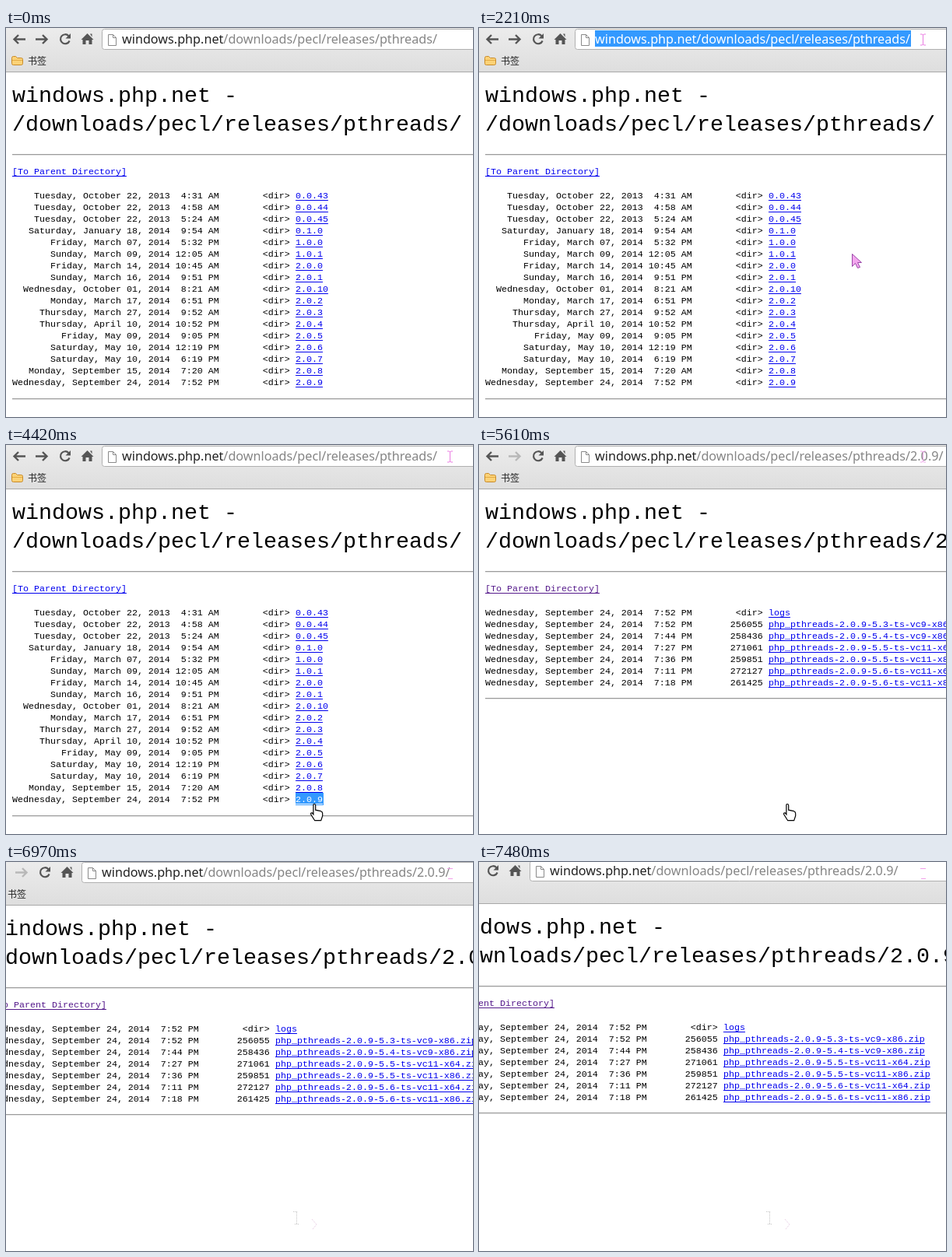
Write an HTML page with a canvas that moves like this. It is 600 by 500 pixels and loops after 7.99 s.

```html
<!DOCTYPE html>
<html lang="zh">
<head>
<meta charset="utf-8">
<style>
  html, body { margin: 0; width: 100%; height: 100%; overflow: hidden; background: #fff; }
  canvas { display: block; }
</style>
</head>
<body>
<canvas id="stage" width="600" height="500"></canvas>
<script>
const ctx = document.getElementById('stage').getContext('2d');
const STEP = 170, STEPS = 47;
const MONO = '"Liberation Mono", monospace';
const LIST_FONT = `${7 / 0.6}px ${MONO}`;      // 7 px per character
const TITLE_FONT = `${17 / 0.6}px ${MONO}`;    // 17 px per character
const URL_FONT = '16.2px "Noto Sans", sans-serif';
const LABEL_FONT = '12px "Noto Sans CJK SC", "Noto Sans CJK", sans-serif';
const LINK = '#0000ee', VISITED = '#551a8b', SELECT = '#3399ff';
const HOST = 'windows.php.net', FOLDER = '/downloads/pecl/releases/pthreads/';

// date, time, size, name
const releases = `Tuesday, October 22, 2013|4:31 AM|<dir>|0.0.43
Tuesday, October 22, 2013|4:58 AM|<dir>|0.0.44
Tuesday, October 22, 2013|5:24 AM|<dir>|0.0.45
Saturday, January 18, 2014|9:54 AM|<dir>|0.1.0
Friday, March 07, 2014|5:32 PM|<dir>|1.0.0
Sunday, March 09, 2014|12:05 AM|<dir>|1.0.1
Friday, March 14, 2014|10:45 AM|<dir>|2.0.0
Sunday, March 16, 2014|9:51 PM|<dir>|2.0.1
Wednesday, October 01, 2014|8:21 AM|<dir>|2.0.10
Monday, March 17, 2014|6:51 PM|<dir>|2.0.2
Thursday, March 27, 2014|9:52 AM|<dir>|2.0.3
Thursday, April 10, 2014|10:52 PM|<dir>|2.0.4
Friday, May 09, 2014|9:05 PM|<dir>|2.0.5
Saturday, May 10, 2014|12:19 PM|<dir>|2.0.6
Saturday, May 10, 2014|6:19 PM|<dir>|2.0.7
Monday, September 15, 2014|7:20 AM|<dir>|2.0.8
Wednesday, September 24, 2014|7:52 PM|<dir>|2.0.9`.split('\n').map(row => row.split('|'));

const files = `7:52 PM|<dir>|logs
7:52 PM|256055|5.3-ts-vc9-x86
7:44 PM|258436|5.4-ts-vc9-x86
7:27 PM|271061|5.5-ts-vc11-x64
7:36 PM|259851|5.5-ts-vc11-x86
7:11 PM|272127|5.6-ts-vc11-x64
7:18 PM|261425|5.6-ts-vc11-x86`.split('\n').map(row => {
  const [time, size, build] = row.split('|');
  const name = size === '<dir>' ? build : `php_pthreads-2.0.9-${build}.zip`;
  return ['Wednesday, September 24, 2014', time, size, name];
});

const arrowShape = new Path2D('M0 0v16l4-4 3 6 3-1-3-6h5z');
const handShape = new Path2D('M6 .5q1.7 0 1.7 1.7v6l7 1.5q2 .7 2 3v3l-2 6h-8l-5-8q-.6-2.2 1.6-1.8l1.6 2v-11.7q0-1.7 1.1-1.7z');
const beamShape = new Path2D('M0 .5h2.5l1 1 1-1h2.5M3.5 1v13M0 14.5h2.5l1-1 1 1h2.5');

const clamp = v => Math.max(0, Math.min(1, v));

function rect(x, y, w, h, color) {
  ctx.fillStyle = color;
  ctx.fillRect(x, y, w, h);
}

function text(str, x, y, font, color = '#000') {
  ctx.font = font;
  ctx.fillStyle = color;
  ctx.fillText(str, x, y);
  return ctx.measureText(str).width;
}

function link(str, x, y, color = LINK) {
  rect(x, y + 2, text(str, x, y, LIST_FONT, color), 1, color);
}

function shape(path, x, y, stroke, fill, width = 1) {
  ctx.save();
  ctx.translate(x, y);
  if (fill) { ctx.fillStyle = fill; ctx.fill(path); }
  if (stroke) { ctx.strokeStyle = stroke; ctx.lineWidth = width; ctx.stroke(path); }
  ctx.restore();
}

const icon = (d, stroke, fill, width) => shape(new Path2D(d), 0, 0, stroke, fill, width);

function highlight(x, y, w, h, drawText) {
  if (w <= 0) return;
  ctx.save();
  ctx.beginPath();
  ctx.rect(x, y, w, h);
  ctx.clip();
  rect(x, y, w, h, SELECT);
  drawText();
  ctx.restore();
}

function rule(y) {
  rect(8, y, 660, 1, '#9a9a9a');
  rect(8, y + 1, 660, 1, '#e4e4e4');
}

function toolbar(path, loading, canGoForward, selected) {
  const shade = ctx.createLinearGradient(0, 0, 0, 56);
  shade.addColorStop(0, '#ececec');
  shade.addColorStop(1, '#dedede');
  rect(0, 0, 700, 56, shade);
  rect(0, 56, 700, 1, '#a8a8a8');

  const dark = '#555';
  icon('M25 14.5H11M16 9l-5.5 5.5L16 20', dark, null, 2.4);
  icon('M38 14.5H52M47 9l5.5 5.5L47 20', canGoForward ? dark : '#b8b8b8', null, 2.4);
  if (loading) {
    icon('M71 9.5l10 10M81 9.5l-10 10', dark, null, 2.4);
  } else {
    icon('M80.5 10.2A6 6 0 1 0 81.6 16.5', dark, null, 2.2);
    icon('M83 7v6.5h-6.5z', null, dark);
  }
  icon('M104.500 7l8 8h-2v6h-4v-5h-4v5h-4v-6h-2zM108 7.500h2.500v4z', null, dark);

  ctx.beginPath();
  ctx.roundRect(123.5, 1.5, 600, 26, 3);
  ctx.fillStyle = '#fff';
  ctx.fill();
  ctx.strokeStyle = '#b0b0b0';
  ctx.lineWidth = 1;
  ctx.stroke();
  icon('M131.500 8.500h6l4 4v10h-10zM137.500 8.500v4h4', '#8a8a8a', '#fff');

  const hostWidth = text(HOST, 149, 20, URL_FONT, '#222');
  text(path, 149 + hostWidth, 20, URL_FONT, '#858585');
  highlight(149, 3, 406 * selected, 21, () => text(HOST + path, 149, 20, URL_FONT, '#fff'));

  icon('M7.500 38.500q0-2 2-2h3l2 2h5q2 0 2 2v5q0 2-2 2h-10q-2 0-2-2z', '#c88a28', '#fbd277');
  icon('M8 41.500h13', '#e3ab45');
  text('书签', 28, 47, LABEL_FONT, '#222');
}

function listing(path, rows, parentColor, selected) {
  text(HOST + ' -', 8, 95, TITLE_FONT);
  text(path, 8, 132, TITLE_FONT);
  rule(162);
  link('[To Parent Directory]', 8, 188, parentColor);
  rows.forEach(([date, time, size, name], i) => {
    const y = 219 + 15 * i;
    const stamp = `${date} ${time.padStart(8)}`.padStart(38);
    text(stamp + size.padStart(13), 8, y, LIST_FONT);
    link(name, 372, y);
  });
  const end = 219 + 15 * rows.length;
  const w = 36 * selected;
  highlight(408 - w, end - 27, w, 16, () => {
    text('2.0.9', 372, end - 15, LIST_FONT, '#fff');
    rect(372, end - 13, 35, 1, '#fff');
  });
  rule(end + (rows === files ? 1 : 2));
}

function pointers(step) {
  const arrow = (x, y) => shape(arrowShape, x, y, '#9a48a8', '#f3a6ee');
  const beam = (x, y, color) => shape(beamShape, x, y, color);

  if (step >= 13 && step < 41) beam(567, 7.5, step < 33 ? '#ea7be2' : '#f0a8ea');
  if (step >= 41) {
    rect(567, 8, 7, 1, '#f2a0ea');
    rect(568, 21, 6, 1, '#f2a0ea');
  }

  if (step === 13) arrow(479.5, 290.5);
  if (step === 14) arrow(434.5, 370.5);
  if (step === 15) arrow(412.5, 459.5);
  if (step >= 16 && step < 19) beam(413.5, 448, '#f0f0f0');
  if (step >= 26 && step < 34) shape(handShape, 390, 461, '#000', '#fff', 1.2);
  if (step === 34 || step === 35) arrow(391.5, 460.5);
  if (step === 36) arrow(556.5, 204.5);

  // faint traces left behind by the pointer
  if (step >= 36) {
    ctx.setLineDash([1, 1]);
    icon('M369 449.500h5M373.500 450v15M371 465.500h6', '#c4c4c4');
    icon('M393 459l6 7-5 6', '#e3c3df');
    ctx.setLineDash([]);
  }
}

function draw(step) {
  const inside = step >= 33;
  const path = FOLDER + (inside ? '2.0.9/' : '');
  const urlSelected = step < 16 ? clamp((step - 3) / 7) : 0;
  const itemSelected = step < 27 ? clamp((step - 19) / 6) : 0;
  const [panX, panY] = [[0, 0], [26, 1], [48, 2], [55, 3], [58, 3]][Math.max(0, Math.min(4, step - 40))];

  rect(0, 0, 600, 500, '#fff');
  ctx.save();
  ctx.translate(-panX, -panY);
  toolbar(path, step >= 29 && !inside, !inside, urlSelected);
  listing(path, inside ? files : releases, inside ? VISITED : LINK, itemSelected);
  ctx.restore();
  pointers(step);
}

const start = performance.now();
function tick() {
  draw(Math.floor((performance.now() - start) / STEP) % STEPS);
  requestAnimationFrame(tick);
}
tick();
</script>
</body>
</html>
```
